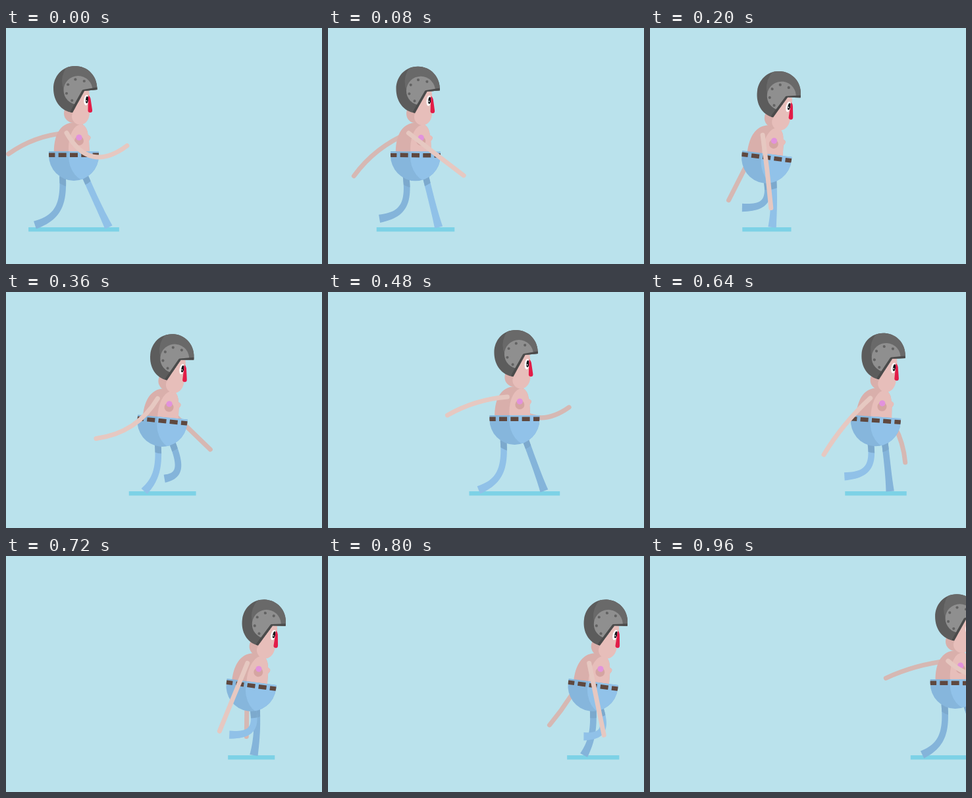
Animation of 480 by 360 pixels, one loop 1 s. Source, as an HTML page with a canvas:

```html
<!DOCTYPE html>
<html lang="en">
<head>
<meta charset="utf-8">
<title>Walk cycle</title>
<style>
html, body { margin: 0; width: 100%; height: 100%; overflow: hidden; background: #bae2ec; }
canvas { display: block; width: 480px; height: 360px; }
</style>
</head>
<body>
<canvas id="stage" width="480" height="360"></canvas>
<script>
const ctx = document.getElementById('stage').getContext('2d');
const { sin, cos, PI, min, max, abs, hypot } = Math;
const LOOP = 1000, STEP = 40, SPEED = 0.3757, RAD = PI / 180;
const NEAR = { leg: '#90c1e8', arm: '#e6c8c1' };
const FAR = { leg: '#84b4da', arm: '#d6b8b3' };
const SKIN = '#e7beba', SKIN_DARK = '#d9afab';

const smooth = u => {
  u = min(1, max(0, u));
  return u * u * (3 - 2 * u);
};
const mix = (a, b, u) => a + (b - a) * u;

// Smooth peak around a moment of the loop
function bump(t, center, width) {
  const d = abs(t - center);
  return smooth(1 - min(d, LOOP - d) / width);
}

// Crouch, 0 to 1, twice per loop: the body sinks and leans as the legs pass
const crouch = t => smooth((1 - cos(2 * PI * (t - 10) / 500)) / 2);

// Joints of a leg, x relative to the hips
function legPose(t) {
  const hip = 17 * cos(2 * PI * t / LOOP) + 5 * crouch(t);
  const swing = max(0, t / 500 - 1);
  const footX = 53 - 112 * min(1, t / 500) + 112 * swing ** 1.8;
  const lift = sin(PI * max(0, (t - 400) / 600) ** 1.25) ** 2;
  const footY = 304 - 32 * lift;
  const bend = 27 * smooth((t - 100) / 500) * (1 - smooth((t - 840) / 160));
  return {
    hip,
    knee: [(hip + footX) / 2 + bend, (230 + footY) / 2 + bend * 0.85],
    foot: [footX, footY]
  };
}

// Arm swing: angle forward of vertical, reach, and sideways bend
function armPose(t) {
  const a = 2 * PI * t / LOOP;
  const deg = -4 + 71 * cos(a) + 8 * cos(2 * a) + 3 * cos(3 * a) - 7 * sin(a) - 7 * sin(3 * a);
  return {
    angle: deg * RAD,
    reach: 112 - 18 * cos(a) ** 8,
    bend: 24 * bump(t, 140, 70) + 27 * bump(t, 360, 90) - 16 * bump(t, 550, 180) - 54 * bump(t, 0, 90)
  };
}

function fill(path, color) {
  ctx.fillStyle = color;
  ctx.fill(path);
}

function oval(x, y, rx, ry, color, rot = 0) {
  ctx.beginPath();
  ctx.ellipse(x, y, rx, ry, rot, 0, PI * 2);
  ctx.fillStyle = color;
  ctx.fill();
}

function within(path, draw) {
  ctx.save();
  ctx.clip(path);
  draw();
  ctx.restore();
}

function placed(x, y, deg, draw) {
  ctx.save();
  ctx.translate(x, y);
  ctx.rotate(deg * RAD);
  draw();
  ctx.restore();
}

// Trouser leg: a bent tube that flares at the hem
function drawLeg(x, y, time, color) {
  const { hip, knee, foot } = legPose(time % LOOP);
  const a = [x + hip, y + 34], k = [x + knee[0], knee[1]], b = [x + foot[0], foot[1]];
  const c = a.map((v, i) => mix(v, k[i], 0.75));
  const d = b.map((v, i) => mix(v, k[i], 0.75));
  const left = [], right = [];
  for (let i = 0; i <= 24; i++) {
    const t = i / 24, s = 1 - t;
    const pos = j => s ** 3 * a[j] + 3 * s * s * t * c[j] + 3 * s * t * t * d[j] + t ** 3 * b[j];
    const vel = j => s * s * (c[j] - a[j]) + 2 * s * t * (d[j] - c[j]) + t * t * (b[j] - d[j]);
    const half = 4.8 + 1.4 * t ** 4, len = hypot(vel(0), vel(1)) || 1;
    const nx = -vel(1) / len * half, ny = vel(0) / len * half;
    left.push([pos(0) + nx, pos(1) + ny]);
    right.unshift([pos(0) - nx, pos(1) - ny]);
  }
  const path = new Path2D();
  left.concat(right).forEach(p => path.lineTo(p[0], p[1]));
  path.closePath();
  fill(path, color);
  within(path, () => oval(x, y + 13, 38.5, 38.5, '#7ca9cd'));
}

function drawArm(x, y, time, color) {
  const { angle, reach, bend } = armPose(time % LOOP);
  const dx = sin(angle), dy = cos(angle);
  ctx.beginPath();
  ctx.moveTo(x, y);
  ctx.quadraticCurveTo(
    x + dx * reach / 2 + dy * bend, y + dy * reach / 2 - dx * bend,
    x + dx * reach, y + dy * reach
  );
  ctx.strokeStyle = color;
  ctx.lineWidth = 7;
  ctx.lineCap = 'round';
  ctx.stroke();
}

const torso = new Path2D('M-30 0C-31-25-23-48 2-48C16-48 21-38 21.5-29Q27-27 25-23L23-20L24 0Z');
const jeans = new Path2D('M-38-4H38V2A38 39 0 0 1-38 2Z');
const face = new Path2D('M6 2L21 3C23 14 23.5 26 22 38C21 49 14 54.5 8 54.5C0 54.5-5 48-5 42C-5 36 0 32 1 28Z');
const nose = new Path2D('M20 10Q22.5 11 23.5 15L26 32Q26.5 36 23 36Q19 36 19.5 32Z');
const shell = new Path2D('M33.5 1C34-20 19-35 0-35C-20-35-33-19-33-1C-33 19-21 34-4 36L14 3Z');
const strap = new Path2D('M-4 34.5L13 4L33 .5');

function drawBody() {
  fill(torso, SKIN_DARK);
  within(torso, () => oval(11, -9, 19, 36, SKIN));
  oval(8, -20, 7, 7, '#d5a5a2');
  oval(8, -25, 4.6, 4.6, '#e292dd');

  fill(jeans, '#86b6dc');
  within(jeans, () => {
    oval(24, 3, 32, 40, '#91c2e9');
    ctx.fillStyle = '#5f483f';
    for (let i = -2; i <= 2; i++) ctx.fillRect(i * 17.3 - 6, -1.5, 12, 6.5);
  });
}

function drawHead() {
  oval(-3, 37, 14, 14.5, SKIN_DARK);
  fill(face, SKIN);
  oval(17, 17, 3.7, 8, '#fff', 0.1);
  oval(18, 16.5, 2, 5.3, '#15151a', 0.1);
  oval(17.3, 18, 0.8, 1.1, '#fff');
  fill(nose, '#e21d48');

  fill(shell, '#5c5c5c');
  within(shell, () => {
    oval(18, -12, 38, 36, '#696969');
    oval(4.5, 2, 22, 22, '#8f8f8f');
    for (let i = 0; i < 5; i++) {
      const a = (120 + i * 46) * RAD;
      oval(4 + 17.5 * cos(a), 2.5 + 17.5 * sin(a), 2.1, 2.1, '#636363');
    }
    ctx.strokeStyle = '#4b4b4b';
    ctx.lineWidth = 6;
    ctx.lineJoin = 'round';
    ctx.stroke(strap);
  });
}

function draw(t) {
  const c = crouch(t), opposite = t + LOOP / 2;
  const x = 103 + SPEED * t - 0.8 * c, y = 192 + 4 * c, lean = 7.7 * c;
  const shoulderX = x - 11 + 5 * c, shoulderY = 160 + 3.5 * c;
  const ground = 52 + 17 * cos(2 * PI * (t + 10) / 500);

  ctx.fillStyle = '#bae2ec';
  ctx.fillRect(0, 0, 480, 360);
  ctx.fillStyle = '#7dd2e6';
  ctx.fillRect(x - ground, 304, ground * 2, 6.5);

  drawArm(shoulderX, shoulderY, opposite, FAR.arm);
  drawLeg(x, y, opposite, FAR.leg);
  drawLeg(x, y, t, NEAR.leg);
  placed(x, y, lean, drawBody);
  placed(x + 2 + 17 * c, 93 + 8.5 * c, lean, drawHead);
  drawArm(shoulderX, shoulderY, t, NEAR.arm);
}

const start = performance.now();
function tick() {
  const t = (performance.now() - start) % LOOP;
  draw(Math.floor(t / STEP) * STEP);
  requestAnimationFrame(tick);
}
tick();
</script>
</body>
</html>
```
